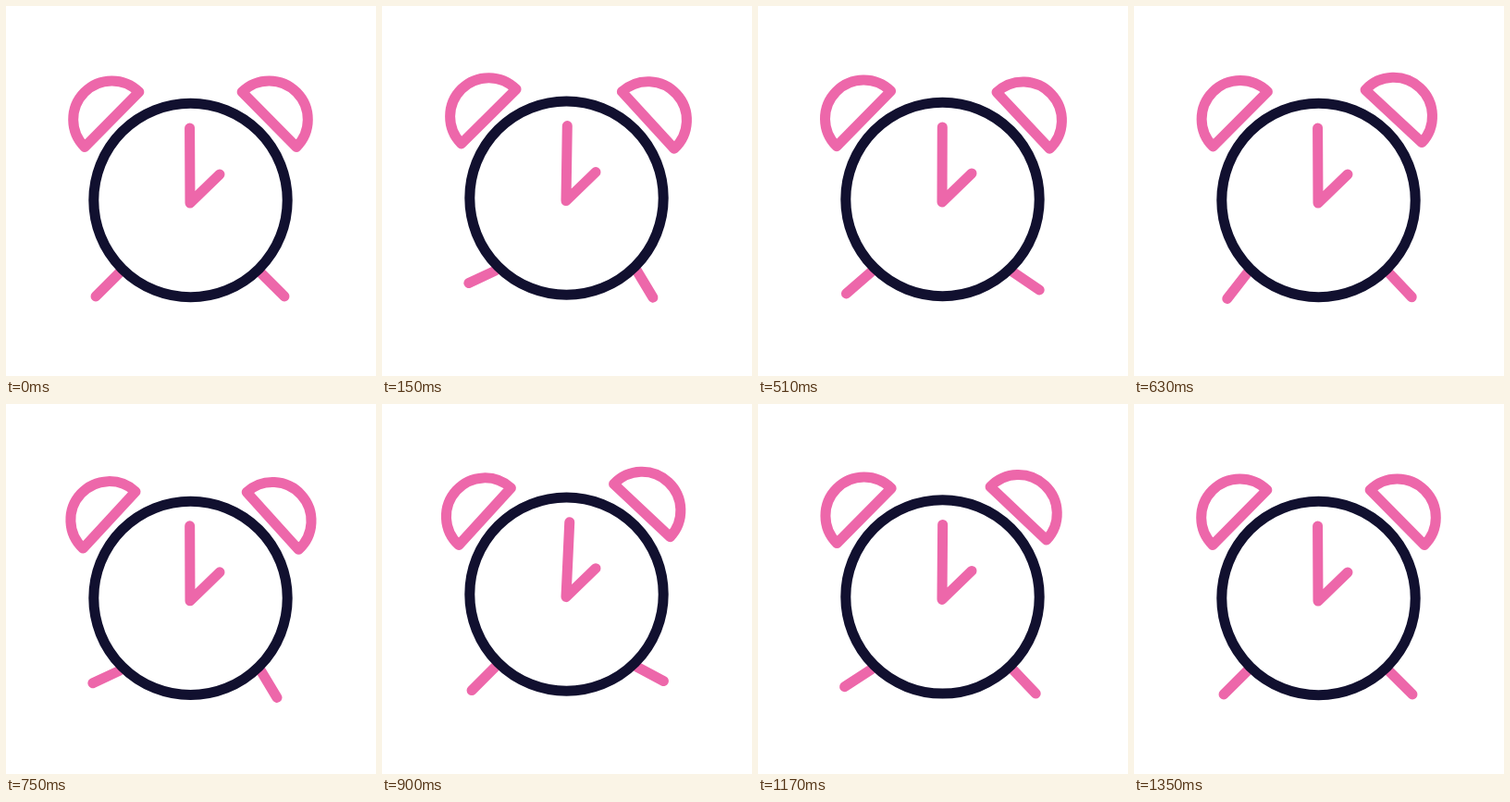
Recreate the animation shown at these times as an HTML page with a canvas. Size 400x400 px, loop 3410 ms.

```html
<!DOCTYPE html>
<html lang="en">
<head>
<meta charset="utf-8">
<title>Alarm clock</title>
<style>
  html, body { margin: 0; width: 100%; height: 100%; overflow: hidden; background: #fff; }
  canvas { display: block; width: 100vmin; height: 100vmin; }
</style>
</head>
<body>
<canvas id="stage" width="400" height="400"></canvas>
<script>
const ctx = document.getElementById('stage').getContext('2d');
const PINK = '#ed67aa', NAVY = '#11102f';
const LOOP = 3410, STEP = 30, STEPS = 45;
const CX = 199.5, CY = 210;
const END = 81; // ringing length in 60 fps ticks
const RAD = Math.PI / 180;

const clamp = (x, a, b) => Math.max(a, Math.min(b, x));
const wave = (f, period) => Math.sin(2 * Math.PI * f / period);
const smooth = (a, b, x) => {
  const u = clamp((x - a) / (b - a), 0, 1);
  return u * u * (3 - 2 * u);
};
// triangle wave, 0 at the start, +1 at a quarter period
const tri = (f, period) => Math.asin(wave(f, period)) * 2 / Math.PI;

// 0 on the ground, 1 at the top of the hop
function hop(f) {
  const h = f % 40.5;
  return smooth(3.4, 14, h) - smooth(23.4, 34, h);
}

function pose(f) {
  const env = clamp(Math.min(f, END - f) / 3, 0, 1);
  const lift = hop(f);
  const h = f % 40.5;
  const swing = tri(f, 12);
  return {
    lift: -4.4 * lift,
    hand: -0.3 + 2.1 * lift + 0.9 * Math.exp(-(((h - 13) / 2.5) ** 2)),
    bellL: env * (-0.8 + 1.4 * Math.cos(2 * Math.PI * (f - 8.9) / 10)),
    bellR: env * -2.5 * clamp(1.55 * wave(f + 0.45, 16), -1, 1),
    legL: env * swing * (swing > 0 ? 12 : 20),
    legR: env * (-1.5 - 15.5 * tri(f + 1.5, 6))
  };
}

function line(...pts) {
  ctx.beginPath();
  pts.forEach(([x, y]) => ctx.lineTo(x, y));
  ctx.stroke();
}

function leg(side, swing) {
  const a = (45 + swing) * RAD;
  const len = 36 - 0.011 * swing * swing;
  const x = 199 + side * 76.5, y = 288.5;
  line([x, y], [x + side * len * Math.cos(a), y + len * Math.sin(a)]);
}

function bell(side, turn) {
  ctx.save();
  ctx.translate(CX, CY);
  ctx.rotate(turn * RAD);
  ctx.scale(side, 1);
  ctx.beginPath();
  ctx.arc(85, -87.3, 41.8, -134.6 * RAD, 45.4 * RAD);
  ctx.closePath();
  ctx.stroke();
  ctx.restore();
}

function draw(f) {
  const p = pose(f);
  ctx.fillStyle = '#fff';
  ctx.fillRect(0, 0, 400, 400);
  ctx.save();
  ctx.translate(0, p.lift);
  ctx.lineWidth = 11;
  ctx.lineCap = ctx.lineJoin = 'round';

  ctx.strokeStyle = PINK;
  leg(-1, p.legL);
  leg(1, p.legR);
  bell(-1, p.bellL);
  bell(1, p.bellR);

  const a = p.hand * RAD;
  line([199 + 81 * Math.sin(a), 213 - 81 * Math.cos(a)], [199, 213], [231, 182]);

  ctx.strokeStyle = NAVY;
  ctx.beginPath();
  ctx.arc(CX, CY, 104.7, 0, 2 * Math.PI);
  ctx.stroke();
  ctx.restore();
}

const start = performance.now();
function tick() {
  const t = Math.max(0, performance.now() - start) % LOOP;
  const n = Math.min(STEPS, Math.floor(t / STEP));
  draw(n * END / STEPS);
  requestAnimationFrame(tick);
}
tick();
</script>
</body>
</html>
```
